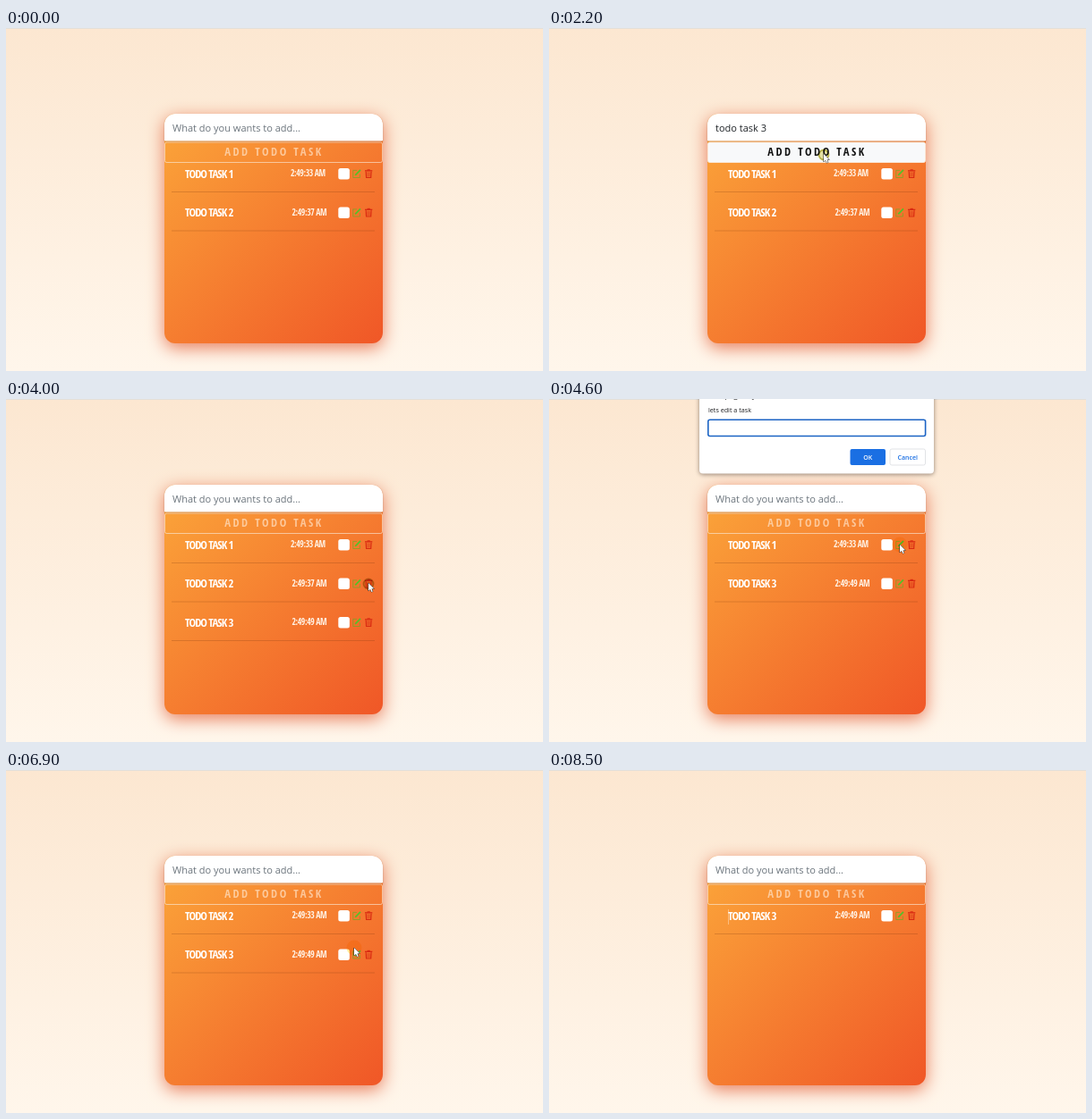
An HTML page with a canvas that plays this animation: 600x384 px, repeating every 8.6 s.

```html
<!DOCTYPE html>
<html lang="en">
<head>
<meta charset="utf-8">
<title>Todo list</title>
<style>
html, body { margin: 0; width: 100%; height: 100%; overflow: hidden; background: #fdeedd; }
canvas { display: block; width: 100vw; height: 100vh; }
</style>
</head>
<body>
<canvas id="stage" width="600" height="384"></canvas>
<script>
const ctx = document.getElementById('stage').getContext('2d');
const LOOP = 8600, STEP = 100;
const UI = '"Open Sans", "Noto Sans", sans-serif';

// The display face is the slimmest installed one, relative to its cap height.
const faces = [
  ['extra-condensed 700', '"Noto Sans", sans-serif'],
  ['condensed 700', '"Open Sans", sans-serif'],
  ['condensed 700', 'Roboto, sans-serif'],
  ['700', '"Roboto Condensed", sans-serif'],
  ['700', '"Open Sans Condensed", sans-serif'],
  ['700', '"Liberation Sans Narrow", sans-serif'],
  ['700', 'Roboto, sans-serif']
].map(([style, family]) => {
  ctx.font = `${style} 100px ${family}`;
  const width = ctx.measureText('TODO TASK 1').width;
  const cap = ctx.measureText('T').actualBoundingBoxAscent;
  return { style, family, slim: width / cap, scale: 457 / width };
});
const face = faces.reduce((a, b) => b.slim < a.slim ? b : a);
const display = size => `${face.style} ${size * face.scale}px ${face.family}`;

// Pointer route: [time, x, y]
const route = [
  [100, 588, 371], [500, 316, 122], [1700, 316, 122], [2100, 307, 141],
  [2300, 307, 141], [2700, 377, 162], [3000, 377, 162], [3200, 378, 202],
  [3500, 378, 202], [3800, 405, 206], [4000, 405, 206], [4400, 392, 163],
  [5700, 392, 163], [6200, 357, 65], [6400, 357, 65], [6900, 389, 199],
  [7100, 389, 199], [7500, 405, 162], [7900, 405, 162], [8400, 592, 378]
];
const clicks = [500, 2200, 2800, 3000, 3300, 3500, 4000, 4500, 6300, 7600];

function pointerAt(t) {
  if (t < 100 || t > 8400) return null;
  const i = Math.max(1, route.findIndex(p => p[0] >= t));
  const [t0, x0, y0] = route[i - 1], [t1, x1, y1] = route[i];
  const u = (t - t0) / (t1 - t0), e = u * u * (3 - 2 * u);
  return { x: x0 + (x1 - x0) * e, y: y0 + (y1 - y0) * e };
}

const typed = (text, t, from, to) =>
  text.slice(0, Math.max(0, Math.ceil(text.length * Math.min(1, (t - from) / (to - from)))));
const within = (t, a, b) => t >= a && t < b;

function entryText(t) {
  if (t < 600 || t >= 2300) return '';
  if (t < 1400) return typed('todo task 1', t, 500, 900);
  return t < 1500 ? 'todo task ' : 'todo task 3';
}

function tasksAt(t) {
  const list = [];
  if (t < 7700) list.push({
    name: t < 6400 ? 'TODO TASK 1' : 'TODO TASK 2', time: '2:49:33 AM',
    checked: within(t, 2800, 3000), focus: within(t, 2800, 3300)
  });
  if (t < 4100) list.push({
    name: 'TODO TASK 2', time: '2:49:37 AM',
    checked: within(t, 3300, 3500), focus: within(t, 3300, 4000)
  });
  if (t >= 2300) list.push({ name: 'TODO TASK 3', time: '2:49:49 AM' });
  return list;
}

function box(x, y, w, h, r, fill, stroke, line = 1) {
  ctx.beginPath();
  ctx.roundRect(x, y, w, h, r);
  if (fill) { ctx.fillStyle = fill; ctx.fill(); }
  if (stroke) { ctx.strokeStyle = stroke; ctx.lineWidth = line; ctx.stroke(); }
}

function label(text, x, y, font, color, spacing = 0, align = 'left') {
  ctx.font = font;
  ctx.fillStyle = color;
  ctx.letterSpacing = spacing + 'px';
  ctx.textAlign = align;
  ctx.fillText(text, x, y);
  ctx.letterSpacing = '0px';
}

function path(points, color, width, close) {
  ctx.beginPath();
  points.forEach(([x, y]) => ctx.lineTo(x, y));
  if (close) ctx.closePath();
  ctx.strokeStyle = color;
  ctx.lineWidth = width;
  ctx.stroke();
}

function disc(x, y, r, fill, ring) {
  ctx.beginPath();
  ctx.arc(x, y, r, 0, Math.PI * 2);
  ctx.fillStyle = fill;
  ctx.fill();
  if (ring) {
    ctx.strokeStyle = ring;
    ctx.lineWidth = 1.8;
    ctx.stroke();
  }
}

function gradient(x0, y0, x1, y1, a, b) {
  const g = ctx.createLinearGradient(x0, y0, x1, y1);
  g.addColorStop(0, a);
  g.addColorStop(1, b);
  return g;
}

function shadow(color, blur, dy) {
  ctx.shadowColor = color;
  ctx.shadowBlur = blur;
  ctx.shadowOffsetY = dy;
}

function drawBackdrop() {
  ctx.fillStyle = gradient(0, 0, 0, 384, '#fce7d1', '#fff6eb');
  ctx.fillRect(0, 0, 600, 384);
  ctx.fillStyle = '#e3dfda';
  ctx.fillRect(0, 0, 600, 1);
  ctx.save();
  shadow('rgba(222,78,36,.72)', 19, 5);
  box(177, 96, 244, 257, 12, gradient(174, 100, 424, 349, '#fba63a', '#f05727'));
  ctx.restore();
}

function drawEntry(t) {
  const text = entryText(t), focused = within(t, 500, 2200);
  ctx.save();
  if (focused) shadow('rgba(13,110,253,.5)', 4, 0);
  else shadow('rgba(120,50,10,.35)', 2, 1);
  box(177, 96, 244, 30.5, [12, 12, 1, 1], '#fff');
  ctx.restore();
  if (focused) box(177.5, 96.5, 243, 29.5, [12, 12, 1, 1], null, '#bdd3f5');
  label(text || 'What do you wants to add...', 186, 116, '11px ' + UI, text ? '#212529' : '#6c757d');

  const hover = text && within(t, 2000, 2300);
  ctx.save();
  if (!text) ctx.globalAlpha = 0.7;
  box(177.5, 128, 243, 22.5, 2, hover ? '#f8f9fa' : null, '#fbeadb', 0.9);
  label('ADD TODO TASK', 299.5, 143.3, display(13.8),
    hover ? '#111' : text ? '#fff' : '#ffe2c8', 2.5, 'center');
  ctx.restore();
}

function drawCheck(task, y) {
  if (task.focus) box(370.3, y - 7.2, 14.6, 14.6, 3.5, 'rgba(112,112,140,.8)');
  box(371.3, y - 6.2, 12.6, 12.6, 2.5, task.checked ? '#0d6efd' : '#fff');
  if (task.checked) path([[374.3, y], [376.8, y + 2.6], [381.1, y - 2.6]], '#fff', 1.5);
}

function drawEditIcon(y) {
  path([[392, y - 3.8], [387.8, y - 3.8], [387.8, y + 4.3], [395.4, y + 4.3], [395.4, y + 0.5]],
    'rgba(105,175,35,.75)', 0.9);
  path([[390.2, y + 1.6], [396, y - 4.4]], '#55c02a', 1.8);
}

function drawTrash(y) {
  const red = '#d92a12';
  ctx.fillStyle = red;
  ctx.fillRect(401, y - 4, 8.3, 1.3);
  ctx.fillRect(403.6, y - 4.9, 3.2, 1.2);
  path([[402.2, y - 2.5], [402.6, y + 4.3], [407.7, y + 4.3], [408.1, y - 2.5]], red, 1.2);
  [404.2, 406.1].forEach(x => path([[x, y - 1.8], [x, y + 3.4]], red, 0.7));
}

function drawTasks(t) {
  tasksAt(t).forEach((task, i) => {
    const y = 163.2 + i * 43.5;
    label(task.name, 200, y + 4.7, display(14), '#fff', -0.95);
    label(task.time, task.name.endsWith('1') ? 318 : 319.5, y + 3.2, display(10.6), '#fff3e6', -0.42);
    drawCheck(task, y);
    drawEditIcon(y);
    drawTrash(y);
    path([[185, y + 20.3], [412, y + 20.3]], 'rgba(110,45,10,.32)', 0.7);
  });
  if (t >= 8300) path([[200.5, 156], [200.5, 173]], 'rgba(255,235,215,.65)', 0.7);
}

function drawDialog(t) {
  if (!within(t, 4600, 6400)) return;
  ctx.save();
  shadow('rgba(60,40,30,.55)', 5, 1);
  box(168, -12, 262, 95.5, 4, '#fff');
  ctx.restore();
  label('This page says', 178, -0.8, '8.5px ' + UI, '#202124');
  label('lets edit a task', 178, 15, '7.2px ' + UI, '#202124');
  box(177.8, 23.3, 242.8, 18.2, 2, '#fff', '#1b63c4', 1.6);
  label(typed('todo task 2', t, 4800, 5600), 182, 35, '7.2px ' + UI, '#202124');
  box(336.5, 56, 39.5, 18, 2, '#1a6fe3');
  box(381, 56, 39.5, 18, 2, '#fff', '#dadce0', 0.8);
  label('OK', 356.2, 67.5, '600 7px ' + UI, '#fff', 0, 'center');
  label('Cancel', 400.8, 67.5, '600 7px ' + UI, '#1a6fe3', 0, 'center');
}

function drawPointer(t) {
  const p = pointerAt(t);
  if (!p) return;
  const { x, y } = p;
  ctx.save();
  ctx.globalCompositeOperation = 'multiply';
  if (clicks.includes(t)) disc(x, y + 1, 5.5, '#ece7a6', '#c4c05a');
  else disc(x, y, 8.5, '#ffef9e');
  ctx.restore();
  if (x > 177 && x < 421 && y > 96 && y < 126) {
    path([[x, y - 4], [x, y + 4]], '#333', 0.9);
    [-4, 4].forEach(d => path([[x - 1.8, y + d], [x + 1.8, y + d]], '#333', 0.8));
    return;
  }
  const arrow = [[0, 0], [0, 8.8], [2, 7], [3.4, 10], [4.8, 9.4], [3.5, 6.5], [6.2, 6.3]]
    .map(([a, b]) => [x + a, y + b]);
  path(arrow, '#222', 1, true);
  ctx.fillStyle = '#fff';
  ctx.fill();
}

function draw(t) {
  drawBackdrop();
  drawEntry(t);
  drawTasks(t);
  drawDialog(t);
  drawPointer(t);
}

const start = performance.now();
function frame() {
  const t = (performance.now() - start) % LOOP;
  draw(Math.floor(t / STEP) * STEP);
  requestAnimationFrame(frame);
}
frame();
</script>
</body>
</html>
```
